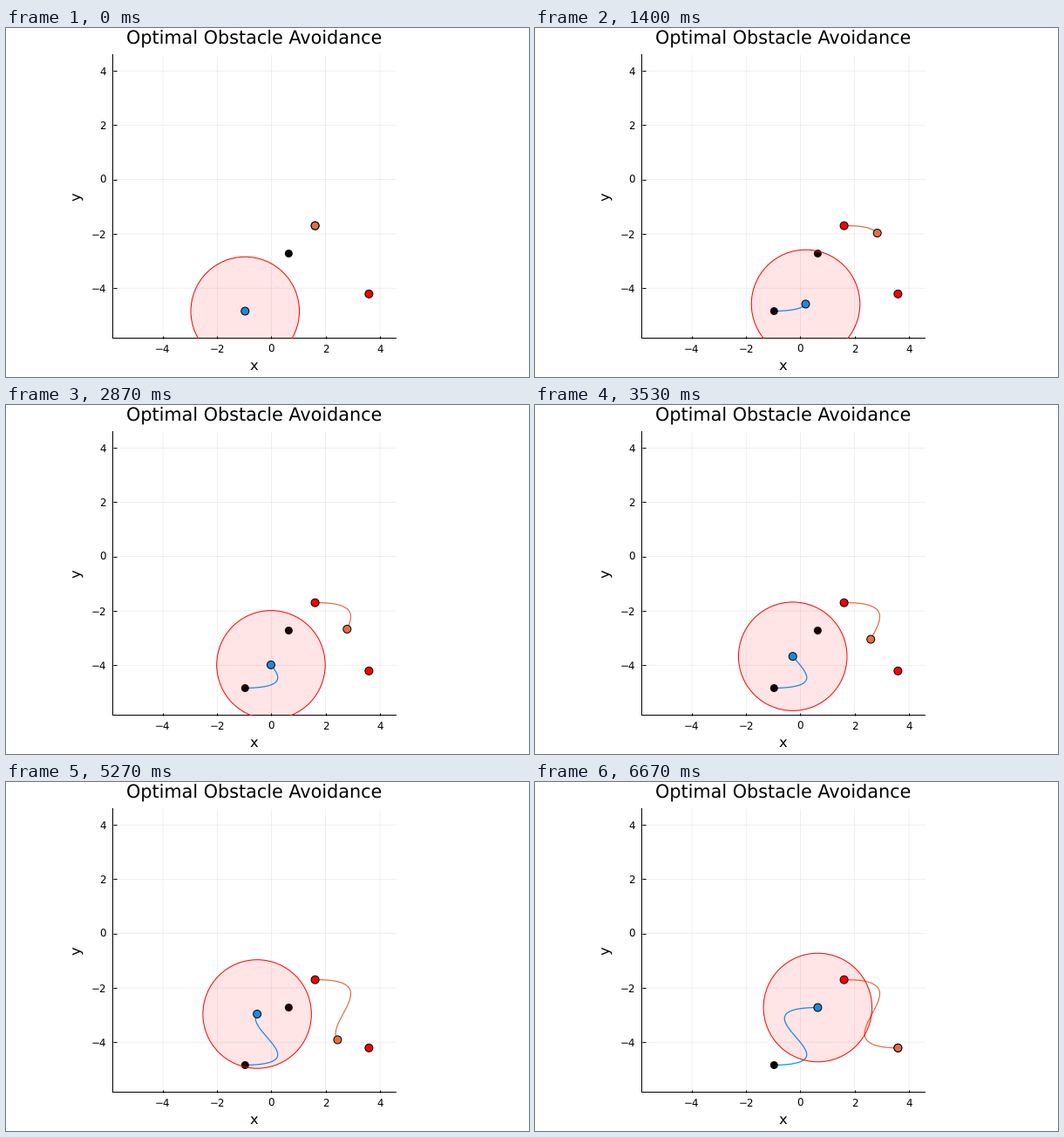
A matplotlib script for the animation above (6740 ms loop, 600 by 400 pixels).

```python
import numpy as np
import matplotlib.pyplot as plt
from matplotlib.animation import FuncAnimation
from matplotlib.patches import Circle

W, H, DPI = 600, 400, 100
STEPS, FPS = 101, 15
LOOP_MS, TICK_MS = 6740, 20
PX = 72 / DPI          # one pixel in points
SCALE = 31.125         # pixels per data unit
LEFT, TOP, SIZE = 122.5, 30.5, 325
BLUE, ORANGE = "#009afa", "#e36f47"

plt.rcParams["font.family"] = "DejaVu Sans"
plt.rcParams["text.hinting"] = "none"
plt.rcParams["path.snap"] = False


def path(points):
    """Quintic through six points evenly spaced in time."""
    coef = np.polyfit(np.linspace(-1, 1, 6), points, 5)
    return np.vander(np.linspace(-1, 1, STEPS), 6) @ coef


blue = path([(-0.970, -4.845), (0.177, -4.606), (0.055, -4.080),
             (-0.448, -3.461), (-0.506, -2.944), (0.639, -2.724)])
orange = path([(1.610, -1.700), (2.811, -1.946), (2.839, -2.563),
               (2.465, -3.306), (2.460, -3.937), (3.595, -4.212)])

fig = plt.figure(figsize=(W / DPI, H / DPI), dpi=DPI, facecolor="white")
ax = fig.add_axes([LEFT / W, 1 - (TOP + SIZE) / H, SIZE / W, SIZE / H])
ax.set_xlim(-5.847, -5.847 + SIZE / SCALE)
ax.set_ylim(-5.841, -5.841 + SIZE / SCALE)
ax.set_xticks(range(-4, 5, 2))
ax.set_yticks(range(-4, 5, 2))
ax.set_axisbelow(True)
ax.grid(color="black", alpha=0.1, linewidth=0.6 * PX)
ax.tick_params(direction="in", length=3.5 * PX, width=PX, pad=5, labelsize=11.9 * PX)
ax.tick_params(axis="y", pad=5.5)
for side, spine in ax.spines.items():
    spine.set_visible(side in ("left", "bottom"))
    spine.set_linewidth(PX)
    spine.set_zorder(1)


def label(x, y, text, size, **kw):
    fig.text(x / W, 1 - y / H, text, fontsize=size * PX, ha="center",
             va="baseline", rotation_mode="anchor", **kw)


label(285, 18.5, "Optimal Obstacle Avoidance", 20.8)
label(284.4, 392, "x", 16.4)
label(86.3, 193, "y", 16.4, rotation=90)


def dot(pos, color, z, edge=1):
    return ax.add_patch(Circle(pos, 4.5 / SCALE, facecolor=color,
                               edgecolor="black", linewidth=edge * PX, zorder=z))


for end in (0, -1):
    dot(blue[end], "black", 3, edge=0)
    dot(orange[end], "red", 3)

agents = []
for pts, color in ((blue, BLUE), (orange, ORANGE)):
    trail, = ax.plot([], [], color=color, linewidth=1.25 * PX, zorder=2)
    agents.append((pts, trail, dot(pts[0], color, 4)))

zone = ax.add_patch(Circle(blue[0], 2, facecolor=(1, 0, 0, 0.1),
                           edgecolor="red", linewidth=PX, zorder=5))


def update(n):
    # steps run at 15 per second, the last one is held to the loop's end
    time = (n + 0.75) * TICK_MS / 1000
    k = min(int(time * FPS), STEPS - 1)
    for pts, trail, head in agents:
        trail.set_data(pts[:k + 1, 0], pts[:k + 1, 1])
        head.center = pts[k]
    zone.center = blue[k]
    return [zone]


def init():
    return update(0)


anim = FuncAnimation(fig, update, frames=LOOP_MS // TICK_MS, init_func=init,
                     interval=TICK_MS, repeat=True, repeat_delay=0)
plt.show()
```
